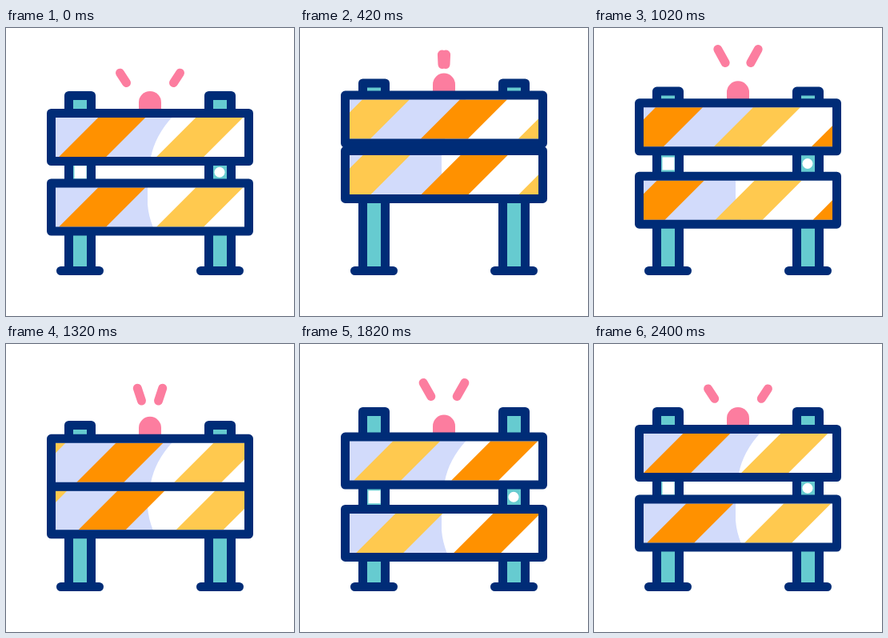
Recreate the animation shown at these times as an HTML page. Size 360 px wide and 360 px high, loop 2420 ms.

```html
<!DOCTYPE html>
<html lang="en">
<head>
<meta charset="utf-8">
<title>Road barrier</title>
<style>
html, body { margin: 0; width: 100%; height: 100%; overflow: hidden; background: #fff; }
svg { display: block; width: 100vw; height: 100vh; }
</style>
</head>
<body>
<svg viewBox="0 0 360 360">
  <defs>
    <clipPath id="panel"><rect x="61" y="10" width="238" height="51"/></clipPath>
    <g id="stripes"></g>
  </defs>
  <g id="posts"></g>
  <g id="light" fill="#fc7d9f">
    <path d="M166 4V-8a14 14 0 0 1 28 0V4z"/>
    <path id="rays" fill="none" stroke="#fc7d9f" stroke-width="11" stroke-linecap="round"/>
  </g>
  <g id="lower"></g>
  <g id="upper"></g>
</svg>
<script>
const LOOP = 2420, TURN = LOOP / 3, PERIOD = 244;
const NAVY = '#002c77', TEAL = '#66cbd0';
const $ = id => document.getElementById(id);

// Pairs of time and vertical offset at the turning points of each bounce
const postKeys = [[0, 0], [280, -33], [700, 36], [1080, -8], [1430, 24], [1780, 0]];
const upperKeys = [[0, 0], [300, -35], [740, 37], [1120, -22], [1470, 33], [2020, 0]];
const lowerKeys = [[0, 0], [360, -43.4], [820, 23], [1190, -33], [1570, 30.3], [2020, 0]];

function bounce(keys, t) {
  for (let i = 1; i < keys.length; i++) {
    const [t0, a] = keys[i - 1], [t1, b] = keys[i];
    if (t < t1) return a + (b - a) * (1 - Math.cos(Math.PI * (t - t0) / (t1 - t0))) / 2;
  }
  return 0;
}

function stripe(x, color) {
  return `<path fill="${color}" d="M${x} 60h59l49 -49h-59z"/>`;
}

function board(id, shade) {
  $(id).innerHTML = `
    <rect x="60" y="9" width="240" height="53" fill="#fff"/>
    <g clip-path="url(#panel)">
      <path fill="#d2dbfb" d="${shade}"/>
      <use href="#stripes"/>
    </g>
    <rect x="56.5" y="5.5" width="247" height="60" fill="none"
      stroke="${NAVY}" stroke-width="11" stroke-linejoin="round"/>`;
  return $(id).querySelector('use');
}

let bands = '';
for (let i = -2; i < 2; i++) {
  bands += stripe(66 + i * PERIOD, '#ff9100') + stripe(188 + i * PERIOD, '#ffc94f');
}
$('stripes').innerHTML = bands;

const upperBands = board('upper', 'M60 10H208Q186 34 181 61H60z');
const lowerBands = board('lower', 'M60 10H177V32Q178 46 184 61H60z');

$('posts').innerHTML = [92.5, 267.5].map((x, i) => `
  <path class="post" fill="${TEAL}" stroke="${NAVY}" stroke-width="11" stroke-linejoin="round" data-x="${x - 14}"/>
  <path d="M${x - 24} 303.5h48" stroke="${NAVY}" stroke-width="11" stroke-linecap="round"/>
  ${i ? `<circle class="glint" cx="${x - .5}" r="6.5" fill="#fff"/>`
      : `<rect class="glint" x="${x - 7}" y="-8" width="15" height="16" fill="#fff"/>`}`).join('');
const posts = [...document.querySelectorAll('.post')];
const glints = [...document.querySelectorAll('.glint')];

const moveY = (el, y) => el.setAttribute('transform', `translate(0 ${y.toFixed(2)})`);
const slide = (el, x) => el.setAttribute('transform', `translate(${(x % PERIOD).toFixed(2)} 0)`);

function drawRays(t) {
  const p = (t % TURN) / TURN;
  const turn = Math.abs(Math.cos(Math.PI * p));
  const grow = Math.sin(Math.PI * Math.pow(p * 2 % 1, .88)) ** 2;
  const s = 1 + .4 * grow;
  const x1 = 37.5 * turn, x2 = (29.5 - 6.2 * grow) * turn;
  const y1 = -44.8 * s, y2 = -32.5 * s;
  $('rays').setAttribute('d',
    `M${180 - x1} ${y1}L${180 - x2} ${y2}M${180 + x1} ${y1}L${180 + x2} ${y2}`);
}

function draw(t) {
  const top = 79 + bounce(postKeys, t);
  const up = 101 + bounce(upperKeys, t);
  const low = 188.5 + bounce(lowerKeys, t);
  for (const post of posts) {
    post.setAttribute('d', `M${post.dataset.x} 303.5V${top + 5.5}h28V303.5z`);
  }
  for (const g of glints) moveY(g, (up + 71 + low) / 2);
  moveY($('light'), up);
  moveY($('upper'), up);
  moveY($('lower'), low);
  slide(upperBands, t * 2 * PERIOD / LOOP);
  slide(lowerBands, t * 2 * PERIOD / 2400);
  drawRays(t);
}

const start = performance.now();
function tick() {
  draw((performance.now() - start) % LOOP);
  requestAnimationFrame(tick);
}
draw(0);
requestAnimationFrame(tick);
</script>
</body>
</html>
```
